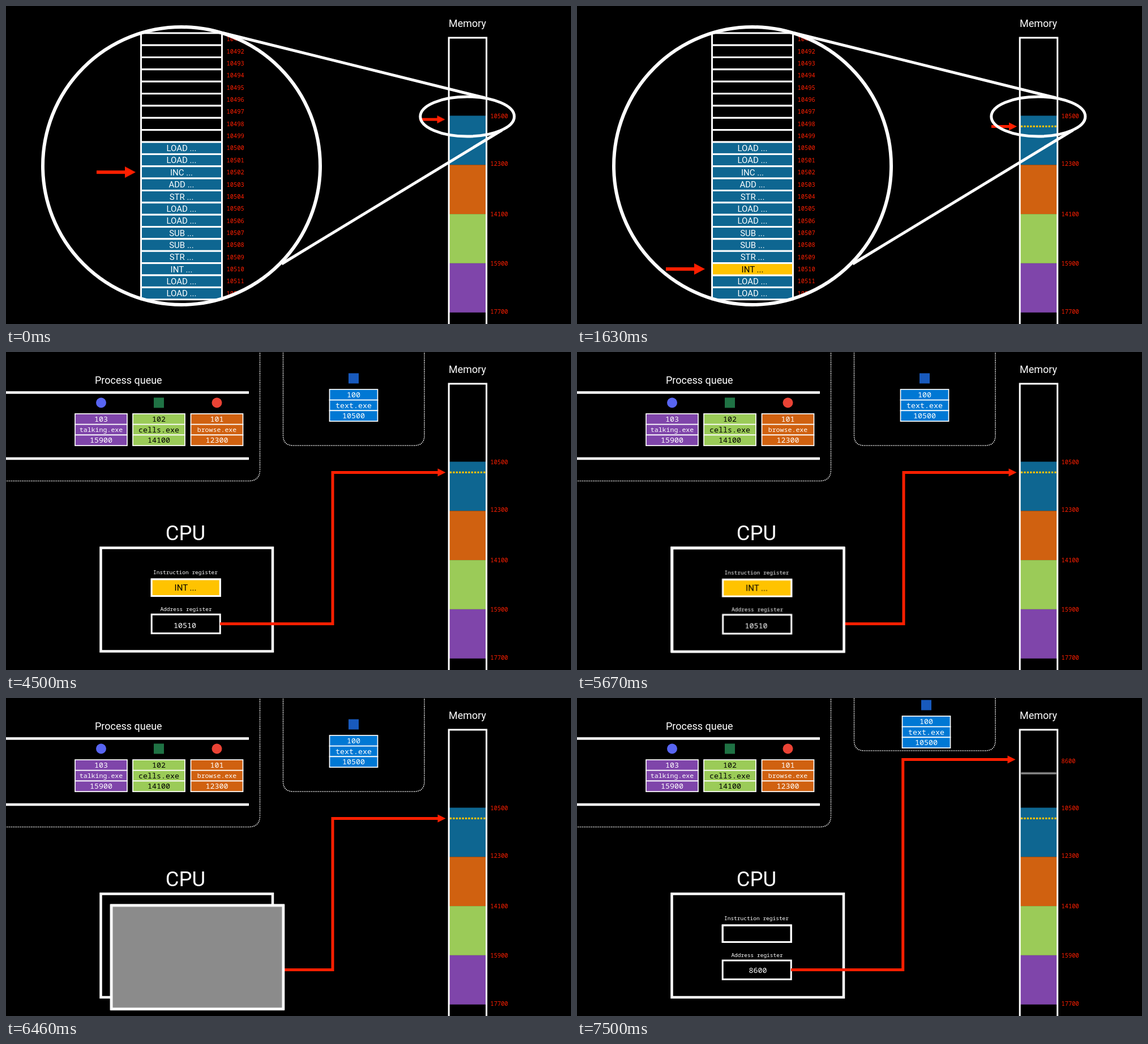
These frames come from a looping animation (998x561 px, 8000 ms). An HTML page:

```html
<!DOCTYPE html>
<html lang="en">
<head>
<meta charset="utf-8">
<title>Interrupt handling</title>
<style>
  html, body { margin: 0; width: 100%; height: 100%; overflow: hidden; background: #000; }
  svg { display: block; width: 100vw; height: 100vh; }
  text { fill: #fff; }
  .sans { font-family: Roboto, sans-serif; }
  .mono { font-family: "Noto Sans Mono", "DejaVu Sans Mono", monospace; }
  .line { fill: none; stroke: #fff; }
  .red { fill: #ff1f00; }
  .wire { fill: none; stroke: #ff1f00; stroke-width: 5; }
  .dark { fill: #000; }

  .anim { animation: 8s linear infinite; }
  .zoom { animation-name: fade-out; }
  .desk { animation-name: fade-in; }
  .step { animation-name: step; }
  .step-small { animation-name: step-small; }
  .hit { animation-name: hit; animation-timing-function: step-end; }
  .copy { animation-name: slide, copy-shown; animation-timing-function: linear, step-end; }
  .block { animation-name: slide, gray, shrink; }
  .before { animation-name: before; }
  .after { animation-name: after; }
  .lift { animation-name: lift; }
  .collapse { animation-name: collapse; }
  .wipe { animation-name: wipe; }

  @keyframes fade-out { 0%, 50.9% { opacity: 1 } 56.25%, 100% { opacity: 0 } }
  @keyframes fade-in { 0%, 50.9% { opacity: 0 } 56.25%, 100% { opacity: 1 } }
  /* the tail of a two-second quadratic ease-in-out, already a fifth of the way along */
  @keyframes step {
    0% { transform: translate(3px, -171px); animation-timing-function: cubic-bezier(.333, .258, .667, .591) }
    4.6% { transform: translate(1.9px, -107px); animation-timing-function: cubic-bezier(.333, .667, .667, 1) }
    17.1%, 100% { transform: none }
  }
  @keyframes step-small {
    0% { transform: translate(-1.5px, -12.4px); animation-timing-function: cubic-bezier(.333, .258, .667, .591) }
    4.6% { transform: translate(-.9px, -7.75px); animation-timing-function: cubic-bezier(.333, .667, .667, 1) }
    17.1%, 100% { transform: none }
  }
  @keyframes hit { 0% { opacity: 0 } 19.25%, 100% { opacity: 1 } }
  @keyframes slide {
    0%, 70.4% { transform: none; animation-timing-function: cubic-bezier(.4, .2, .6, .8) }
    80.5%, 100% { transform: translate(18.7px, 20.5px) }
  }
  @keyframes copy-shown { 0% { opacity: 0 } 70.4% { opacity: 1 } 81.25%, 100% { opacity: 0 } }
  @keyframes gray { 0%, 75.6% { opacity: 0 } 80.5%, 100% { opacity: 1 } }
  @keyframes shrink {
    0%, 81.25% {
      x: 167.5px; y: 345.5px; width: 303.5px; height: 182.5px; stroke: #fff; stroke-width: 4.5px;
      animation-timing-function: ease-in-out;
    }
    91.1%, 100% { x: 765.3px; y: 110.6px; width: 63.5px; height: 3.5px; stroke: #8b8b8b; stroke-width: 0 }
  }
  @keyframes before { 0%, 81.25% { opacity: 1 } 91.1%, 100% { opacity: 0 } }
  @keyframes after { 0%, 81.25% { opacity: 0 } 91.1%, 100% { opacity: 1 } }
  @keyframes lift {
    0%, 81.25% { transform: none; animation-timing-function: ease-in-out }
    91.1%, 100% { transform: translate(3px, -34px) }
  }
  @keyframes collapse {
    0%, 81.25% { transform: none; animation-timing-function: ease-in-out }
    91.1%, 100% { transform: translateY(-72px) }
  }
  @keyframes wipe {
    0%, 91.75% { clip-path: inset(-9px 100% -9px -9px) }
    93.75%, 100% { clip-path: inset(-9px -9px -9px -9px) }
  }
</style>
</head>
<body>
<svg id="stage" viewBox="0 0 998 561" preserveAspectRatio="none"></svg>
<script>
const BLUE = '#0e6691', ORANGE = '#d06110', GREEN = '#9bcb58', PURPLE = '#7f45aa', YELLOW = '#ffc300';

// Text is placed by the middle of its capitals.
const label = (font, x, cy, str, size, cls = '', anchor = 'middle') =>
  `<text class="${font} ${cls}" x="${x}" y="${cy + size * 0.356}" font-size="${size}" text-anchor="${anchor}">${str}</text>`;
const sans = (...args) => label('sans', ...args);
const mono = (...args) => label('mono', ...args);
const address = (x, cy, n) => mono(x, cy, n, 10.4, 'red', 'start');
const box = (x, y, w, h, fill, stroke = 0) =>
  `<rect x="${x}" y="${y}" width="${w}" height="${h}" fill="${fill}" stroke="#fff" stroke-width="${stroke}"/>`;
const path = (d, width, extra = '') => `<path class="line" d="${d}" stroke-width="${width}" ${extra}/>`;
const group = (cls, ...parts) => `<g class="anim ${cls}">${parts.join('')}</g>`;
const head = (x, y, length, half) =>
  `<path class="red" d="M${x} ${y}l${-length} ${-half}v${2 * half}z"/>`;

function memory() {
  const fills = [BLUE, ORANGE, GREEN, PURPLE]
    .map((color, i) => box(783, 193.5 + i * 86.8, 65, 86.8, color)).join('');
  const marks = [[194, 10500], [278.5, 12300], [367, 14100], [453.8, 15900], [539.5, 17700]]
    .map(([y, n]) => address(855.5, y, n)).join('');
  return sans(815, 30.3, 'Memory', 18) + fills + path('M782.2 570V56H848.7V570', 3) + marks +
    group('hit', path('M784 212.4H848', 3.2, `style="stroke:${YELLOW}" stroke-dasharray="3.2 2.2"`));
}

function magnifier() {
  const code = 'LOAD LOAD INC ADD STR LOAD LOAD SUB SUB STR INT LOAD LOAD'.split(' ');
  const top = 47.8, pitch = 21.36;
  let cells = '', marks = '';
  for (let i = 0; i < 22; i++) {
    const y = top + i * pitch, mid = y + pitch / 2, op = code[i - 9];
    cells += box(238.5, y, 143, pitch, op ? BLUE : '#000', 3);
    if (op) cells += sans(310, mid, op + ' ...', 15);
    marks += address(389.5, mid, 10491 + i);
  }
  const hitY = top + 19 * pitch;
  const hit = group('hit', box(238.5, hitY, 143, pitch, YELLOW, 3),
    sans(310, hitY + pitch / 2, 'INT ...', 15, 'dark'));
  const bigArrow = group('step', '<path class="red" d="M157 461h50v6h-50z"/>', head(226, 464, 19, 10));
  const smallArrow = group('step-small', '<path class="red" d="M732 210h32v5h-32z"/>', head(777, 212.5, 14, 7));
  return group('zoom',
    `<clipPath id="lens"><circle cx="310" cy="282" r="245"/></clipPath>`,
    `<g clip-path="url(#lens)">${marks}</g>`, cells, hit, bigArrow, smallArrow,
    '<circle class="line" cx="310" cy="282" r="245" stroke-width="6"/>',
    '<ellipse class="line" cx="814.8" cy="195" rx="83" ry="35" stroke-width="5"/>',
    path('M383 47.5L846 162M487 455L876 219', 5));
}

function task(cx, top, width, color, id, name, start, size, textClass = '') {
  const row = 18.7, lines = [[id, 13.3], [name, size], [start, 13.3]];
  return lines.map(([str, px], i) =>
    box(cx - width / 2, top + i * row, width, row, color, 1.7) +
    mono(cx, top + (i + 0.5) * row, str, px, textClass)).join('');
}

const badge = (cx, cy, color, round) =>
  `<rect x="${cx - 9}" y="${cy - 9}" width="18" height="18" rx="${round ? 9 : 0}" fill="${color}"/>`;

function queue() {
  const dots = 'stroke-dasharray="1.6 1.6"';
  return sans(216.3, 49.8, 'Process queue', 18) +
    path('M0 71.5H429M0 188H429', 4.6) +
    path('M-4 227.5H428.5Q448.5 227.5 448.5 207.5V-4', 1.6, dots) +
    badge(168, 89.5, '#5865f2', true) + badge(270, 89.5, '#1f7244') + badge(372.5, 89.5, '#ea4335', true) +
    task(168, 109, 92, PURPLE, 103, 'talking.exe', 15900, 11.6) +
    task(270, 109, 92, GREEN, 102, 'cells.exe', 14100, 13.3, 'dark') +
    task(372.5, 109, 92, ORANGE, 101, 'browse.exe', 12300, 11.6) +
    group('collapse', path('M489.5 -4V147Q489.5 165 507.5 165H721Q739 165 739 147V-4', 1.6, dots)) +
    group('lift', badge(614, 46.5, '#185abd'), task(614, 66, 85, '#0078d4', 100, 'text.exe', 10500, 13.3));
}

const instruction = box(257.2, 401, 121, 29.5, YELLOW, 3) + sans(317, 415.5, 'INT ...', 15, 'dark');
const value = mono(316, 481.8, 10510, 13.3);
const frame = box(167.5, 345.5, 303.5, 182.5, '#000', 4.5) +
  mono(317, 388.5, 'Instruction register', 9.5) + mono(318, 453.3, 'Address register', 9.5) +
  box(257.2, 401, 121, 29.5, '#000', 3) + box(257.2, 463, 121, 33.3, '#000', 3);

function pointer(cls, bend, y, tip) {
  return group(cls, `<path class="wire" d="M378 479.5H${bend}V${y}H${tip - 13}"/>`, head(tip, y, 14, 7));
}

function desk() {
  return group('desk', queue(),
    sans(317, 319, 'CPU', 36.5), frame,
    group('before', instruction, value),
    group('after', box(257.2, 401, 121, 29.5, 'none', 3), mono(319.5, 479.8, 8600, 13.3), address(855.5, 111.3, 8600)),
    pointer('before', 577, 212.5, 776.5),
    pointer('wipe', 575.7, 108.5, 774.5),
    group('copy', frame, instruction, value),
    '<rect class="anim block" fill="#8b8b8b"/>');
}

document.getElementById('stage').innerHTML = memory() + magnifier() + desk();
</script>
</body>
</html>
```
